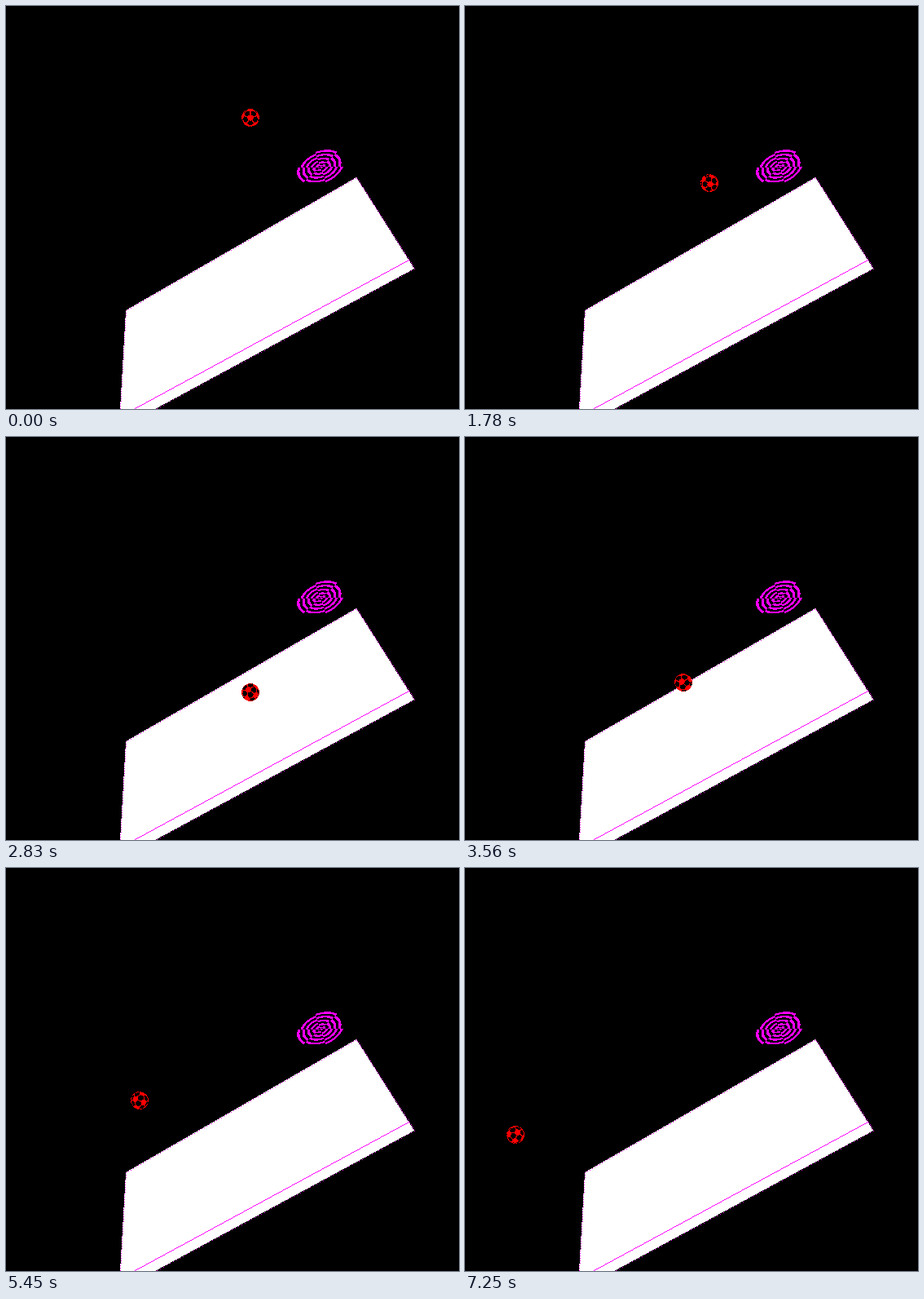
An HTML page with a canvas for the animation above (7270 ms loop, 556 by 494 pixels).

```html
<!DOCTYPE html>
<html lang="en">
<head>
<meta charset="utf-8">
<title>Bouncing ball</title>
<style>
  html, body { margin: 0; width: 100%; height: 100%; overflow: hidden; background: #000; }
  canvas { display: block; }
</style>
</head>
<body>
<canvas id="stage" width="556" height="494"></canvas>
<script>
const W = 556, H = 494, LOOP = 7270;
const MAGENTA = "#f0f", RED = "#f00";
const ctx = document.getElementById("stage").getContext("2d");

// Simulation pacing: [first step ms, last step ms, number of steps]
const PACE = [
  [20, 740, 29], [760, 1480, 30], [1510, 2230, 30], [2280, 2980, 29], [3010, 3730, 30],
  [3750, 4460, 29], [4480, 5200, 26], [5220, 5920, 28], [5950, 6670, 29], [6700, 7250, 23]
];

function stepAt(t) {
  let n = 0;
  for (const [start, end, count] of PACE) {
    if (t >= end) n += count;
    else if (t >= start) n += 1 + Math.floor((t - start) / (end - start) * (count - 1) + 0.3);
  }
  return n;
}

const GRAVITY = 0.0107, FLOOR = 327, HIT = 118;

function ballAt(n) {
  if (n < HIT) return [300, Math.min(FLOOR, 137 + 0.37 * n + GRAVITY * n * n)];
  const x = Math.min(299, 300 - 1.45 * (n - 119));
  return [x, Math.min(FLOOR, 277.8 + GRAVITY * (n - 187.7) ** 2)];
}

function pixelLine(c, x0, y0, x1, y1, every) {
  const len = Math.max(Math.abs(x1 - x0), Math.abs(y1 - y0));
  for (let i = 0; i <= len; i++) {
    if (i % every) continue;
    const k = i / len;
    c.fillRect(Math.round(x0 + (x1 - x0) * k), Math.round(y0 + (y1 - y0) * k), 1, 1);
  }
}

const SLAB = [[147, 373], [430, 210], [501, 322], [183, 494], [140, 494]];

function drawSlab(c) {
  c.fillStyle = "#fff";
  for (let y = 210; y < H; y++) {
    const cuts = [];
    SLAB.forEach(([ax, ay], i) => {
      const [bx, by] = SLAB[(i + 1) % SLAB.length];
      const m = y + 0.5;
      if ((ay <= m) !== (by <= m)) cuts.push(ax + (bx - ax) * (m - ay) / (by - ay));
    });
    cuts.sort((a, b) => a - b);
    if (cuts.length < 2) continue;
    const left = Math.round(cuts[0]);
    c.fillRect(left, y, Math.round(cuts[1]) - left, 1);
  }
  c.fillStyle = MAGENTA;
  pixelLine(c, 147, 373, 430, 210, 3);
  pixelLine(c, 430, 210, 501, 321, 2);
  pixelLine(c, 501, 322, 183, 494, 4);
  pixelLine(c, 147, 373, 140, 494, 3);
  pixelLine(c, 494, 311, 158, 493, 1);
}

// Tilted oval with checkered rings
function drawOval(c) {
  const cx = 386, cy = 197.5, tilt = -0.38;
  const cos = Math.cos(tilt), sin = Math.sin(tilt);
  c.fillStyle = MAGENTA;
  for (let y = 174; y < 222; y++) {
    for (let x = 355; x < 418; x++) {
      const dx = x + 0.5 - cx, dy = y + 0.5 - cy;
      const u = (dx * cos + dy * sin) / 30, v = (dy * cos - dx * sin) / 19.5;
      const r = Math.hypot(u, v);
      if (r > 1) continue;
      const ring = Math.floor(r * 9);
      const sector = Math.floor((Math.atan2(v, u) + Math.PI + 0.5) / (Math.PI / 3));
      if ((ring + sector) % 2 === 0) c.fillRect(x, y, 1, 1);
    }
  }
}

const scene = document.createElement("canvas");
scene.width = W;
scene.height = H;
{
  const c = scene.getContext("2d");
  c.fillStyle = "#000";
  c.fillRect(0, 0, W, H);
  drawSlab(c);
  drawOval(c);
}

// Twelve patch centres: the corners of an icosahedron
const PATCHES = [];
{
  const phi = (1 + Math.sqrt(5)) / 2, len = Math.hypot(1, phi);
  for (const a of [-1 / len, 1 / len]) {
    for (const b of [-phi / len, phi / len]) PATCHES.push([0, a, b], [a, b, 0], [b, 0, a]);
  }
}

const dot = (a, b) => a[0] * b[0] + a[1] * b[1] + a[2] * b[2];
const cross = (a, b) => [
  a[1] * b[2] - a[2] * b[1], a[2] * b[0] - a[0] * b[2], a[0] * b[1] - a[1] * b[0]
];

function spin([x, y, z], n) {
  const a = n * 0.035, b = 0.55 + n * 0.012;
  const x1 = x * Math.cos(a) - y * Math.sin(a), y1 = x * Math.sin(a) + y * Math.cos(a);
  return [x1, y1 * Math.cos(b) - z * Math.sin(b), y1 * Math.sin(b) + z * Math.cos(b)];
}

function drawBall(n) {
  const R = 11;
  const [bx, by] = ballAt(n).map(Math.round);
  const patches = PATCHES.map(p => spin(p, n));
  for (let j = -R; j < R; j++) {
    for (let i = -R; i < R; i++) {
      const x = (i + 0.5) / R, y = (j + 0.5) / R, rr = x * x + y * y;
      if (rr > 0.98) continue;
      const p = [x, y, Math.sqrt(1 - rr)];
      const [near, next] = patches.slice().sort((a, b) => dot(b, p) - dot(a, p));
      const patch = dot(near, p) > 0.94;
      const seam = Math.abs(dot(cross(near, next), p)) < 0.05;
      const rim = rr > 0.84 && (i + j) % 3 !== 0;
      ctx.fillStyle = patch || seam || rim ? RED : "#000";
      ctx.fillRect(bx + i, by + j, 1, 1);
    }
  }
}

const began = performance.now();

function draw() {
  const t = Math.max(0, performance.now() - began) % LOOP;
  ctx.drawImage(scene, 0, 0);
  drawBall(stepAt(t));
  requestAnimationFrame(draw);
}
draw();
</script>
</body>
</html>
```
